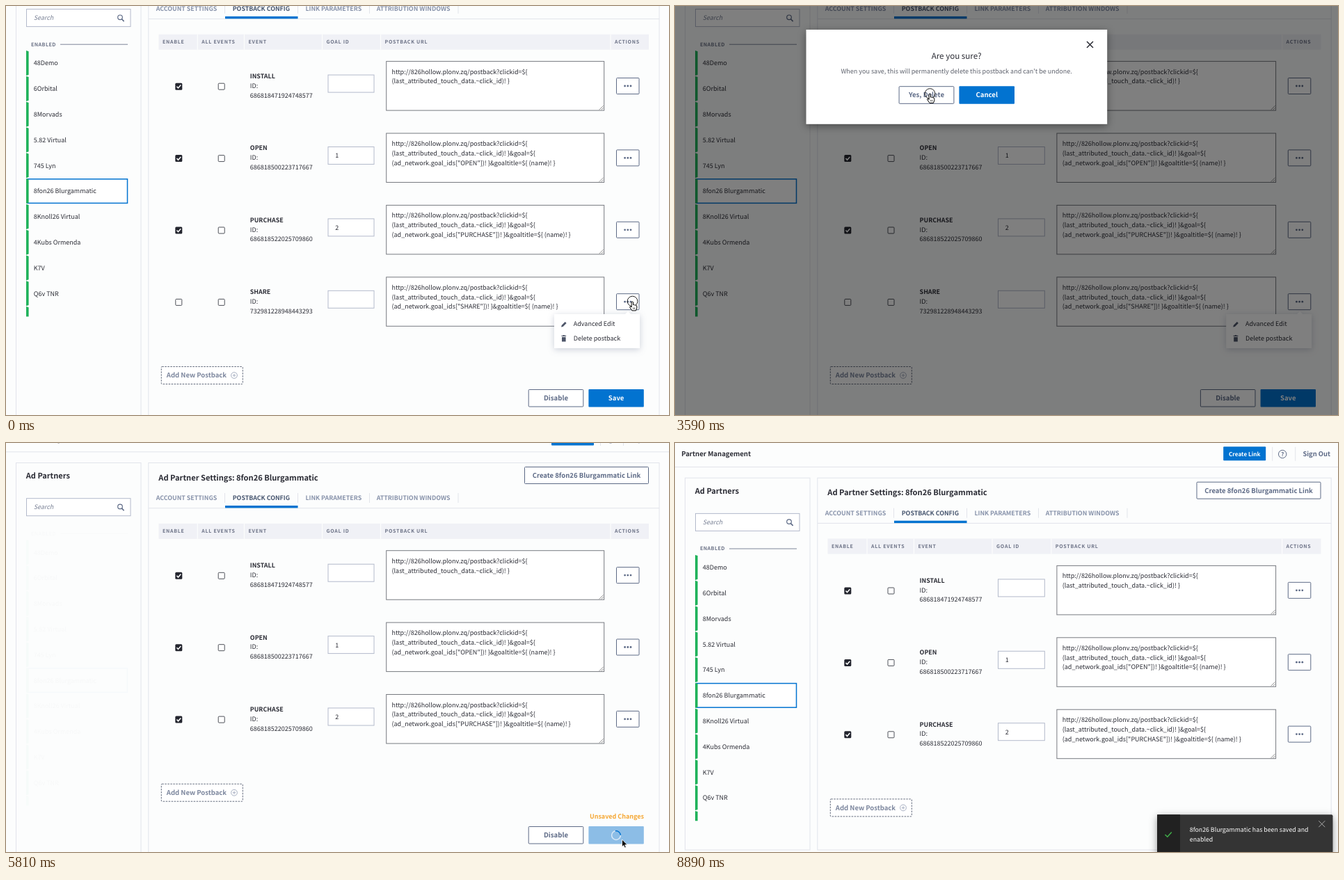
Write an HTML page that moves like this. It is 953 px wide and 588 px high and loops after 9.41 s.

```html
<!DOCTYPE html>
<html lang="en">
<head>
<meta charset="utf-8">
<title>Postback settings</title>
<style>
html, body { margin: 0; width: 100%; height: 100%; overflow: hidden; background: #fcfdfd; }
svg { display: block; width: 953px; height: 588px; }
text {
  font-family: "Noto Sans CJK JP", "Noto Sans CJK SC", "Noto Sans CJK", "Noto Sans", sans-serif;
  text-rendering: geometricPrecision;
}
.menu { filter: drop-shadow(0 2px 5px rgba(60, 70, 110, .25)); }
.modal { filter: drop-shadow(0 3px 6px rgba(0, 0, 0, .4)); }
</style>
</head>
<body>
<svg id="stage" viewBox="0 0 953 588"></svg>
<script>
const LOOP = 9410, PITCH = 103.4;
const INK = '#2b2c35', BLUE = '#0273d0', SLATE = '#5d6a86', MUTED = '#8792aa', LINE = '#e2e4eb', PAGE = '#fcfdfd';
const PARTNER = '8fon26 Blurgammatic';
const PARTNERS = ['48Demo', '6Orbital', '8Morvads', '5.82 Virtual', '745 Lyn', PARTNER,
  '8Knoll26 Virtual', '4Kubs Ormenda', 'K7V', 'Q6v TNR'];
const EVENTS = [
  ['INSTALL', '686818471924748577', ''],
  ['OPEN', '686818500223717667', '1'],
  ['PURCHASE', '686818522025709860', '2'],
  ['SHARE', '732981228948443293', '']
];

// time, x, y, ring opacity
const POINTER = [
  [0, 900.5, 424.5, 1], [150, 900.5, 424.5, .6], [300, 900.5, 424.5, .25], [450, 900.5, 424.5, 0],
  [750, 899, 429, 0], [900, 892, 442, 0], [1050, 880, 459, 0], [1200, 869, 471, 0], [1350, 865.5, 474.5, 0],
  [1800, 865.5, 474.5, 1], [1950, 865.5, 474.5, 0],
  [2250, 640, 270, 0], [2400, 517, 167, 0],
  [2700, 500, 161, 0], [2850, 440, 143, 0], [3000, 385, 129, 0], [3140, 366.5, 126, 0],
  [3590, 366.5, 126, 1], [3730, 366, 125, 0],
  [4180, 570, 320, 0], [4330, 771.5, 509.5, 0],
  [4630, 778, 516, 0], [4780, 805, 535, 0], [4930, 845, 556, 0], [5070, 876, 567, 0], [5220, 885.5, 570, 0],
  [5520, 885.5, 570, 1], [5670, 885.5, 570, 0]
];

const esc = s => s.replace(/&/g, '&amp;').replace(/</g, '&lt;');
const clamp = v => Math.max(0, Math.min(1, v));
const attrs = o => Object.entries(o).map(([k, v]) => ` ${k}="${v}"`).join('');
const text = (x, y, size, str, fill = INK, more = {}) =>
  `<text x="${x}" y="${y}" font-size="${size}" fill="${fill}"${attrs(more)}>${esc(str)}</text>`;
const bold = (x, y, size, str, fill, more = {}) => text(x, y, size, str, fill, { 'font-weight': 700, ...more });
const mid = (x, y, size, str, fill) => bold(x, y, size, str, fill, { 'text-anchor': 'middle' });
const rect = (x, y, w, h, fill, stroke = 'none', more = {}) =>
  `<rect x="${x}" y="${y}" width="${w}" height="${h}" fill="${fill}" stroke="${stroke}"${attrs(more)}/>`;
const path = (d, stroke, width = 1, fill = 'none', more = {}) =>
  `<path d="${d}" stroke="${stroke}" stroke-width="${width}" fill="${fill}"${attrs(more)}/>`;
const circle = (x, y, r, fill, stroke = 'none', width = 1, more = {}) =>
  `<circle cx="${x}" cy="${y}" r="${r}" fill="${fill}" stroke="${stroke}" stroke-width="${width}"${attrs(more)}/>`;
const group = (body, more) => `<g${attrs(more)}>${body}</g>`;
const button = (x, y, w, h, label, solid, size = 9.6, fill = BLUE) => solid
  ? rect(x, y, w, h, fill, 'none', { rx: 1 }) + mid(x + w / 2, y + h / 2 + 3.4, size, label, '#fff')
  : rect(x + .5, y + .5, w - 1, h - 1, '#fff', SLATE, { rx: 1 }) + mid(x + w / 2, y + h / 2 + 3.4, size, label, SLATE);

function topBar(w) {
  const d = 4.2 * w;
  return path('M0 12.8H953', LINE) +
    bold(9.2, -2.4, 9.6, 'Partner Management') +
    button(784 + d, -16.5, 61, 20, 'Create Link', true, 8.2) +
    path(`M${854.5 + d} -16V4M${887.5 + d} -16V4`, LINE) +
    circle(869 + d, -5.7, 5.7, 'none', SLATE) +
    mid(869 + d, -2.8, 8, '?', SLATE) +
    bold(898.2 + d, -2.4, 9.4, 'Sign Out', SLATE);
}

function partnerList(opacity) {
  if (!opacity) return '';
  let s = bold(36, 132.8, 7.2, 'ENABLED', '#6c7387', { 'letter-spacing': .4 }) + path('M78 130.3H175', '#7d8598');
  for (let i = 0; i <= PARTNERS.length; i++) {
    const c = 157.2 + 36.8 * i, name = PARTNERS[i];
    if (name === PARTNER) s += rect(31, c - 17.3, 143.5, 34.6, '#fff', BLUE, { 'stroke-width': 1.5 });
    s += path(`M29 ${c - 18}L32.6 ${c - 16.8}V${c + 16.8}L29 ${c + 18}Z`, 'none', 0, '#1fb25a');
    if (name) s += text(39.8, c + 3.3, 9, name);
  }
  return group(s, { opacity, 'clip-path': 'url(#list)' });
}

function side(bottom, listOpacity) {
  return rect(14.5, 28.5, 179.5, bottom - 28.5, PAGE, LINE) +
    bold(28.8, 51.2, 11, 'Ad Partners') +
    rect(29.5, 79.7, 149.5, 25, '#fff', '#b3bacb') +
    text(39.8, 95, 8.9, 'Search', '#7a8296', { 'font-style': 'italic' }) +
    circle(164, 91.4, 3.3, 'none', SLATE, 1.2) + path('M166.4 93.9L169.6 97.2', SLATE, 1.6) +
    partnerList(listOpacity);
}

function checkbox(x, y, on) {
  return on
    ? rect(x - 5, y - 5, 10, 10, '#24262f', 'none', { rx: 1.5 }) + path(`M${x - 2.8} ${y}l2 2.2l3.8 -4.4`, '#fff', 1.5)
    : rect(x - 4.5, y - 4.5, 9, 9, '#fff', '#4d5058', { rx: 1 });
}

function eventRow(i, w) {
  const [name, id, goal] = EVENTS[i], y = 190.4 + PITCH * i;
  const ex = 350.8 + .8 * w, gx = 463 + 1.5 * w, ux = 546.7 + 2.2 * w, uw = 313 + 1.7 * w, ax = 877 + 3.8 * w;
  const top = y - 35.7, tail = ` }&goaltitle=\${ (name)! }`;
  const url = ['http://826hollow.plonv.zq/postback?clickid=${',
    '(last_attributed_touch_data.~click_id)! }' + (i ? '&goal=${' : '')];
  if (i) url.push(`(ad_network.goal_ids["${name}"])!${tail}`);
  const rx = ux + uw - 1, ry = y + 34;
  return checkbox(248.3, y + .4, i < 3) + checkbox(309.7 + .8 * w, y + .4, false) +
    bold(ex, y - 11.2, 8.9, name) + text(ex, y + 2.6, 9, 'ID:') + text(ex, y + 16.3, 9, id) +
    rect(gx, y - 16.2, 66 + .8 * w, 25, '#fff', '#b3bacb') + text(gx + 10.3, y - .2, 9, goal) +
    rect(ux, top, uw, 70.5, '#fff', '#777a80') +
    url.map((l, k) => text(ux + 7.8, top + 18 + 13.8 * k, 9, l)).join('') +
    path(`M${rx - 6} ${ry}l6 -6M${rx - 3} ${ry}l3 -3`, '#777', .8) +
    rect(ax + .5, y - 11.8, 32.5, 23, '#fff', SLATE, { rx: 1 }) +
    [-4.2, 0, 4.2].map(d => circle(ax + 16.8 + d, y - .3, 1.4, SLATE)).join('');
}

function settings(w, bottom, rows) {
  const right = 939 + 4.2 * w, edge = 924 + 4.5 * w;
  let s = rect(204.8, 28.5, right - 204.8, bottom - 28.5, PAGE, LINE) +
    bold(219.3, 53.6, 11.1, 'Ad Partner Settings: ' + PARTNER) +
    button(edge - 179, 34, 179, 25, `Create ${PARTNER} Link`, false, 9.5) +
    path(`M205 93.7H${right}`, LINE) + rect(315, 90, 104.5, 3.4, BLUE);
  const tabs = ['ACCOUNT SETTINGS', 'POSTBACK CONFIG', 'LINK PARAMETERS', 'ATTRIBUTION WINDOWS'];
  [215.8, 325.7, 430.4, 532.8].forEach((x, i) => s += bold(x, 82.3, 8.85, tabs[i], i === 1 ? '#46556f' : MUTED));
  s += path('M314.5 72v14M419.5 72v14M522.5 72v14M650 72v14', LINE);

  s += rect(219.5, 115.8, edge - 219.5, 22, '#f0f1f6');
  const heads = [[225, 0, 'ENABLE'], [281.3, .7, 'ALL EVENTS'], [348.5, .9, 'EVENT'], [460.5, 1.6, 'GOAL ID'],
    [544.5, 2.3, 'POSTBACK URL'], [875, 3.6, 'ACTIONS']];
  heads.forEach(([x, d, label], i) => {
    if (i) s += path(`M${x + d * w - 6} 115.8v22`, PAGE, 1.2);
    s += bold(x + d * w, 129.3, 7, label, '#6c7286', { 'letter-spacing': .75 });
  });
  for (let i = 0; i < rows; i++) s += eventRow(i, w);

  const y = 502.7 + PITCH * (rows - 3);
  return s + rect(223.3, y - 12.5, 117, 25, '#fff', '#626a7c', { 'stroke-dasharray': '2.5 1.5', rx: 1 }) +
    bold(230.8, y + 3.4, 9.5, 'Add New Postback', '#7d879e') +
    circle(328, y, 4.4, 'none', '#a9b1c3') + path(`M325.8 ${y}h4.4M328 ${y - 2.2}v4.4`, '#a9b1c3');
}

function footer(w, unsaved, saving, hover, angle) {
  const d = 4.2 * w;
  let s = unsaved ? bold(917, 540.3, 9, 'Unsaved Changes', '#f5a733', { 'text-anchor': 'end' }) : '';
  s += button(750.7 + d, 551, 79.6, 25.5, 'Disable', false);
  if (!saving) return s + button(837.4 + d, 551, 79.4, 25.5, 'Save', true, 9.5, hover ? '#0068bd' : BLUE);
  return s + rect(837.4, 551, 79.4, 25.5, '#8cbde6', 'none', { rx: 1 }) +
    circle(877, 564, 6.4, 'none', '#d9e9f7', 1.5) +
    path('M881.1 559.1A6.4 6.4 0 0 1 881.1 568.9', BLUE, 1.6, 'none', { transform: `rotate(${angle} 877 564)` });
}

function menu(w, hover) {
  const x = 788 + 4.2 * w;
  let s = path(`M${x} 443h${102}l4 -4l4 4h13v49h-123z`, 'none', 0, '#fff', { class: 'menu' });
  if (hover) s += rect(x, hover === 1 ? 447 : 467.6, 123, 20.6, '#dfe2e9');
  return s + text(x + 27.8, 460.2, 9, 'Advanced Edit') + text(x + 27.8, 481.2, 9, 'Delete postback') +
    path(`M${x + 10} 461.6l.7 -2.6l5 -5l1.9 1.9l-5 5z`, 'none', 0, '#4d5568') +
    path(`M${x + 10.5} 475h6.6v-1.2h-2l-.6 -.8h-1.4l-.6 .8h-2zM${x + 11} 476h5.6v6.4h-5.6z`, 'none', 0, '#4d5568');
}

function modal() {
  return rect(0, 0, 953, 588, '#000', 'none', { opacity: .5 }) +
    rect(188.5, 34, 432.7, 135.8, '#fff', 'none', { class: 'modal' }) +
    path('M592 51l9 9M601 51l-9 9', INK, 1.5) +
    text(404.6, 76, 11.6, 'Are you sure?', INK, { 'text-anchor': 'middle' }) +
    text(404.6, 97.4, 9, "When you save, this will permanently delete this postback and can't be undone.",
      '#5c606b', { 'text-anchor': 'middle' }) +
    button(321.6, 115.2, 79.8, 25.6, 'Yes, Delete', false) + button(408.4, 115.2, 79.6, 25.6, 'Cancel', true);
}

function toast(y) {
  return rect(693, y, 252.5, 58, '#343434', 'none', { class: 'modal', rx: 2 }) + rect(693, y, 33, 58, '#212121') +
    path(`M704.5 ${y + 28.8}l3.3 3.2l6 -6.8`, '#3fae49', 1.5) +
    text(739.8, y + 24.8, 8.8, PARTNER + ' has been saved and', '#fff') + text(739.8, y + 38.6, 8.8, 'enabled', '#fff') +
    path(`M925.3 ${y + 9}l9 9M934.3 ${y + 9}l-9 9`, '#aaa');
}

function pointer(x, y, ring, hand) {
  const shape = hand
    ? path('M-1.4 1.2Q-.2 -.4 1 1.2V5.2Q2.2 4.5 3 5.5Q4.2 5 4.8 6Q6.3 5.8 6.3 7.4V9.6L5 13.4H-.6L-3.6 9Q-4.4 7.5 -3 7.3L-1.4 8.5Z',
      '#000', 1, '#fff') + path('M1.2 9v2.4M3.2 9v2.4', '#000', .7)
    : path('M0 0V10.6L2.4 8.4L4 12.1L5.8 11.3L4.2 7.7H7.6Z', '#fff', .8, '#000');
  return group((ring ? circle(0, 0, 7.3, 'none', '#222', 1, { opacity: ring }) : '') + shape,
    { transform: `translate(${x} ${y})` });
}

function draw(t) {
  const asking = t >= 1950 && t < 3730, first = t < 3730, saving = t >= 5670 && t < 7870, done = t >= 7870;
  const w = asking || done ? 1 : 0;
  const scroll = first ? -75.1 : done ? 21.7 : 0;
  const bottom = done ? 563.3 : 700;
  const tick = Math.floor((t - 5520) / 147.3) * 147.3;
  const list = t < 5670 ? 1 : t < 5810 ? .45 : t < 6700 ? .02 : done ? clamp((tick - 2350) / 590) : 0;
  const [, x, y, ring] = POINTER.filter(p => p[0] <= t).pop();
  const onSave = x >= 837 && y > 551 && t < 5670;
  const hand = t < 900 || (x < 401 && t >= 3000 && t < 3730) || onSave;

  let s = group(topBar(w) + side(bottom, list) + settings(w, bottom, first ? 4 : 3),
    { transform: `translate(0 ${scroll})` });
  if (!done) s += footer(w, !first, saving, onSave, (tick - 290) * .36);
  if (first) s += menu(w, asking || t < 900 ? 0 : y < 467.6 ? 1 : 2);
  if (asking) s += modal();
  if (t >= 7580) s += toast(534 + 54 * Math.pow(1 - clamp((tick - 1900) / 1430), 2));
  if (t < 6550) s += pointer(x, y, ring, hand);
  return '<defs><clipPath id="list"><rect x="28" y="120" width="152" height="401.5"/></clipPath></defs>' + s;
}

const stage = document.getElementById('stage'), begin = performance.now();
let shown = '';
function frame() {
  const next = draw((performance.now() - begin) % LOOP);
  if (next !== shown) stage.innerHTML = shown = next;
  requestAnimationFrame(frame);
}
frame();
</script>
</body>
</html>
```
